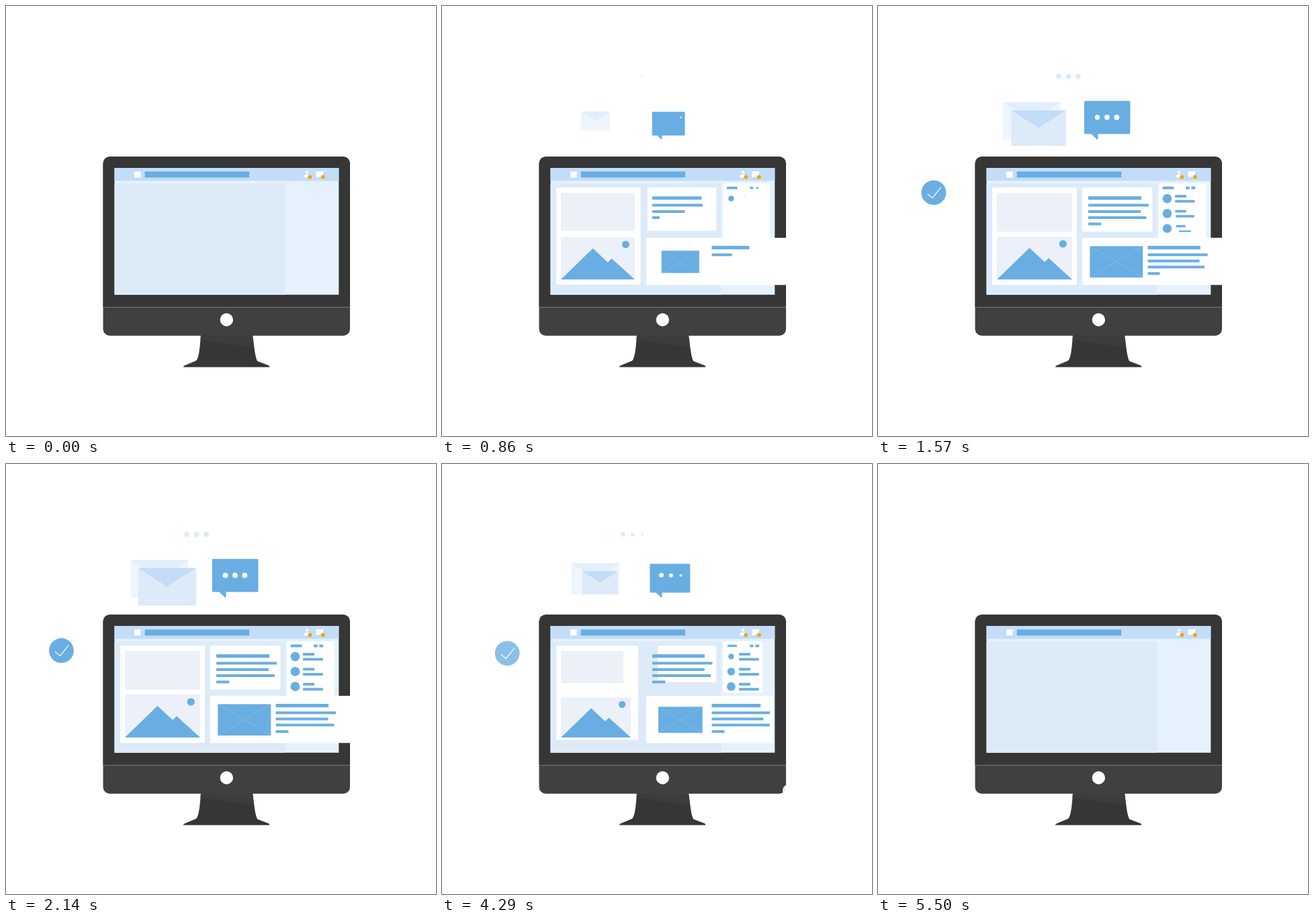
Recreate the animation shown at these times as an HTML page. Size 640x640 px, loop 5.64 s.

```html
<!DOCTYPE html>
<html lang="en">
<head>
<meta charset="utf-8">
<title>Desktop layout</title>
<style>
  html, body { margin: 0; width: 100%; height: 100%; overflow: hidden; background: #fff; }
  svg { display: block; width: 100vw; height: 100vh; }
</style>
</head>
<body>
<svg id="stage" viewBox="0 0 640 640">
  <path fill="#363636" d="M290 490C288.500 510 287 524 283 528L266 535Q263 536.500 264.500 537.500H392Q393 536.500 391 535L374 528.500C370 520 369.500 505 367 490Z"/>
  <path fill="#3c3c3c" d="M290 490H367L369 508L289.400 497Z"/>
  <rect x="144.500" y="224.300" width="367.500" height="266.500" rx="10" fill="#404040"/>
  <path fill="#363636" d="M144.500 448V234.300a10 10 0 0 1 10-10H502a10 10 0 0 1 10 10V448Z"/>
  <path stroke="#8c8c8c" stroke-width=".8" d="M144.500 448.400H512"/>
  <circle cx="328.300" cy="467" r="9.700" fill="#fff"/>
  <rect x="161.500" y="241" width="333.800" height="188.700" fill="#e5f2fe"/>
  <rect x="161.500" y="264" width="254" height="165.700" fill="#ddebf8"/>
  <rect x="161.500" y="241" width="333.800" height="19.300" fill="#c3ddf8"/>
  <rect x="191" y="246.300" width="9.500" height="9" fill="#fff"/>
  <rect x="206.700" y="246.300" width="155.300" height="9" fill="#69aee2"/>
  <g fill="#fff">
    <circle cx="448" cy="247.300" r="2.100"/>
    <path d="M443 255.300Q443.500 250.500 448 250.500T453 255.300Z"/>
    <path d="M461.500 246H472V254H465L462.300 256V254H461.500Z"/>
  </g>
  <circle cx="452.300" cy="254.500" r="2.900" fill="#f5a300"/>
  <circle cx="471.800" cy="254.500" r="2.900" fill="#f5a300"/>
</svg>
<script>
const LOOP = 5640, STEP = 500 / 7, LAST = 78, EASE = 1000;
const BLUE = '#69aee2', PALE = '#ddebf8', SKY = '#c3ddf8', GREY = '#ecf0f8', WHITE = '#fff';
const stage = document.getElementById('stage');
const parts = [];

const rect = (x, y, w, h, fill, rx = 0) =>
  `<rect x="${x}" y="${y}" width="${w}" height="${h}" rx="${rx}" fill="${fill}"/>`;
const dot = (x, y, r, fill) => `<circle cx="${x}" cy="${y}" r="${r}" fill="${fill}"/>`;
const shape = (d, fill) => `<path d="${d}" fill="${fill}"/>`;

// Each part enters from time a and is gone at time b.
function add(markup, a, b, pose) {
  const node = document.createElementNS('http://www.w3.org/2000/svg', 'g');
  node.innerHTML = markup;
  stage.append(node);
  parts.push({ node, a, b, pose });
}

const scale = (ox, oy) => s => `translate(${ox} ${oy}) scale(${s}) translate(${-ox} ${-oy})`;
const widen = ox => s => `translate(${ox} 0) scale(${s} 1) translate(${-ox} 0)`;

function envelope(x, y, body, flap) {
  return rect(x, y, 86.5, 56, body) +
    shape(`M${x} ${y}h86.500l-43.250 27.700Z`, flap);
}

function slide(markup, a, b, dx, dy) {
  add(markup, a, b, s => `translate(${dx * (1 - s)} ${dy * (1 - s)})`);
  parts[parts.length - 1].fade = true;
}

// Panels
add(rect(170, 270.3, 126, 144.8, WHITE), 70, 4785, scale(170, 270.3));
add(rect(177, 278.3, 112, 57.5, GREY), 278, 4543, scale(177, 278.3));
add(rect(177, 343, 112, 64, GREY) +
  shape('M177 407L225.500 360L248 381L254 375.300L289 407Z', BLUE) +
  dot(275.2, 354, 5.6, BLUE), 278, 4665, scale(177, 407));
add(rect(304, 270.3, 104.3, 65.5, WHITE), 278, 4543, scale(408.3, 270.3));
add(rect(418.3, 264, 70.7, 92, WHITE), 278, 4543, scale(418.3, 264));
add(rect(304, 345, 227, 70.2, WHITE), 476, 4543, widen(304));
add(rect(315.3, 357.4, 79, 46.8, BLUE) +
  '<path d="M315.300 357.400l79 46.800m0-46.800l-79 46.800" stroke="#8cc0ea" stroke-width=".700"/>',
  678, 4543, scale(354.8, 380.8));

// Text blocks: [y, width, height]
function lines(x, rows, a, b, first) {
  rows.forEach(([y, w, h], i) => add(rect(x, y, w, h, BLUE), a + 120 * i, b + 120 * i,
    i ? widen(x) : first));
}
lines(313, [[283.2, 79, 5.3], [294.5, 90, 4], [304, 78, 4], [313, 87, 4], [322.4, 19.3, 4]],
  478, 4893, scale(313, 285.8));
lines(401.5, [[357, 78.5, 5.2], [368.3, 89.5, 4], [377.5, 78, 4], [386.5, 86.7, 4], [396.2, 19, 4]],
  678, 4663, widen(401.5));

// Side list
[[423.5, 16.7], [458, 5.6], [466.4, 5.8]].forEach(([x, w], i) =>
  add(rect(x, 268.7, w, 4, BLUE), 478 + 120 * i, 4543 + 120 * i, scale(x + w / 2, 270.7)));
for (let i = 0; i < 3; i++) {
  const y = 286.6 + 22.3 * i, a = 838 + 240 * i, b = 4883 + 240 * i;
  add(dot(430.4, y, 6.9, BLUE), 718 + 200 * i, 4423 + 120 * i, scale(430.4, y));
  add(rect(442, y - 5.4, 17, 3.9, BLUE), a, b, scale(450.5, y - 3.4));
  add(rect(442, y + 2.1, 29.8, 3.9, BLUE), a + 120, b + 120, scale(457, y + 4));
}

// Floating items
add(envelope(185.2, 143, '#eff5fd', '#e1effc'), 758, 4543, scale(228.4, 171));
add(envelope(196.6, 154.7, PALE, SKY), 1158, 4423, scale(228, 167));
add(rect(306.8, 141.2, 68.7, 49.3, BLUE, 1.5) +
  shape('M317 190L325.500 198.200Q327.500 199.500 327.500 197V190Z', BLUE), 678, 4583, scale(327, 198));
for (let i = 0; i < 3; i++) {
  const a = 798 + 200 * i, b = 4383 + 90 * i;
  add(dot(298 - 14.5 * i, 104.8, 4, PALE), a, b, scale(298 - 14.5 * i, 104.8));
  add(dot(355.3 - 14.4 * i, 165.7, 3.9, WHITE), a, b, scale(355.3 - 14.4 * i, 165.7));
}
slide(dot(82.4, 277.7, 18.4, BLUE) +
  '<path d="M73 279.300L80.500 285.500L93.300 269.600" fill="none" stroke="#fff" stroke-width="1.200"/>',
  878, 4500, 65, 18);
slide(dot(522.3, 498.5, 9, WHITE), 878, 4620, -65, -128);

const expo = ms => ms <= 0 ? 0 : ms >= EASE ? 1 : 1 - 2 ** (-10 * ms / EASE);

function draw(time) {
  const t = Math.min(LAST, Math.floor((time % LOOP + 6) / (LOOP / 79))) * STEP;
  for (const { node, a, b, pose, fade } of parts) {
    const s = Math.min(expo(t - a), expo(b - t));
    node.style.display = s > 0 ? '' : 'none';
    if (s > 0) node.setAttribute('transform', pose(s));
    if (fade) node.setAttribute('opacity', s);
  }
}

const start = performance.now();
function tick() {
  draw(performance.now() - start);
  requestAnimationFrame(tick);
}
tick();
</script>
</body>
</html>
```
